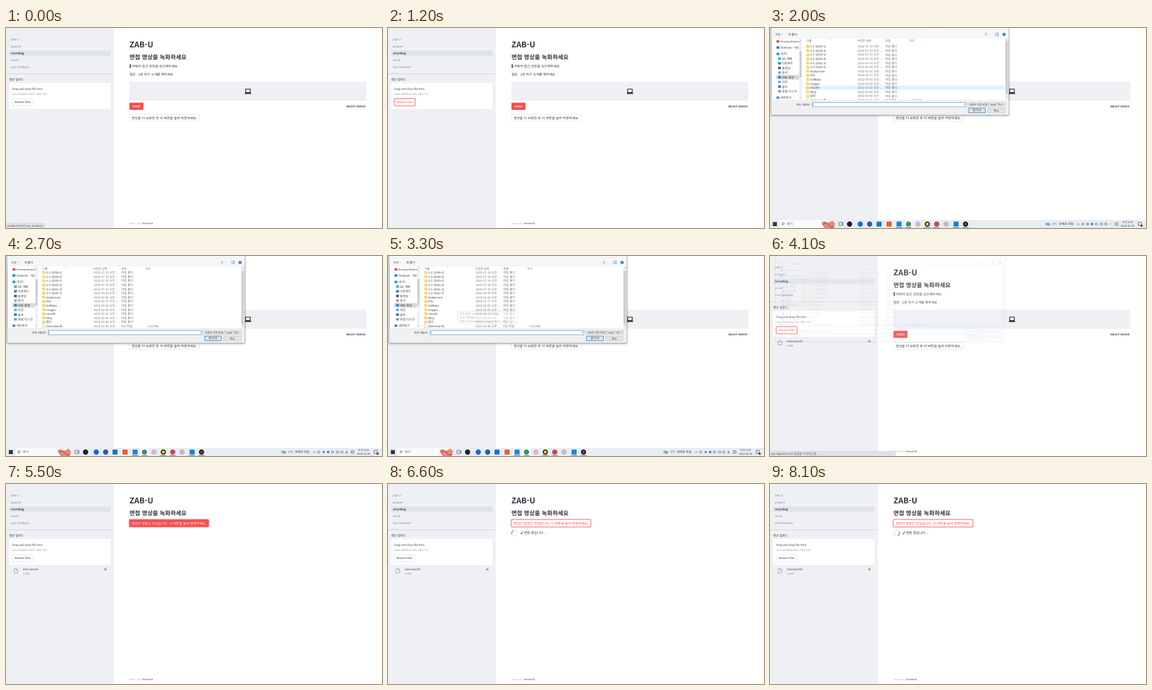
These frames come from a looping animation (600 px wide and 320 px high, 8200 ms). An HTML page:

```html
<!DOCTYPE html>
<html lang="ko">
<head>
<meta charset="utf-8">
<title>Recording page</title>
<style>
  html, body { margin: 0; width: 100%; height: 100%; overflow: hidden; background: #fff; }
  svg { display: block; width: 600px; height: 320px; text-rendering: geometricPrecision;
        font-family: "Noto Sans CJK KR", "Noto Sans CJK JP", "Noto Sans CJK", "Noto Sans", sans-serif; }
</style>
</head>
<body>
<svg id="stage" viewBox="0 0 600 320" xmlns="http://www.w3.org/2000/svg"></svg>
<script>
const LOOP = 8200, STEP = 100;
const INK = '#31333f', MUTED = '#8b8d96', PANEL = '#eef0f4', RED = '#f64e4e';

// y is the middle of the line of text
const text = (x, y, size, str, fill = INK, extra = '') =>
  `<text x="${x}" y="${(y + size * 0.36).toFixed(2)}" font-size="${size}" fill="${fill}" ${extra}>${str}</text>`;
const rect = (x, y, w, h, fill, extra = '') =>
  `<rect x="${x}" y="${y}" width="${w}" height="${h}" fill="${fill}" ${extra}/>`;
const circle = (x, y, r, fill, extra = '') =>
  `<circle cx="${x}" cy="${y}" r="${r}" fill="${fill}" ${extra}/>`;
const path = (d, stroke, width = 0.6, extra = '') =>
  `<path d="${d}" fill="none" stroke="${stroke}" stroke-width="${width}" ${extra}/>`;
const group = (id, body, extra = '') => `<g id="${id}" ${extra}>${body}</g>`;
const BOLD = 'font-weight="700"', MID = 'text-anchor="middle"';

function button(x, y, w, h, label, size, { fill = '#fff', ink = INK, edge = '#d6d7dc', glow = false } = {}) {
  const halo = glow ? rect(x - 0.6, y - 0.6, w + 1.2, h + 1.2, 'none', 'rx="1.6" stroke="#f64e4e" stroke-opacity=".4" stroke-width="1.3"') : '';
  return halo + rect(x, y, w, h, fill, `rx="1.2" stroke="${edge}" stroke-width=".6"`) +
    text(x + w / 2, y + h / 2, size, label, ink, MID);
}

function sidebar() {
  const items = ['ZAB-U', 'prepare', 'recording', 'result', 'user feedback'];
  const browse = [10.2, 113.2, 32.8, 11, 'Browse files', 4.5];
  return rect(0, 0, 172, 320, PANEL) +
    rect(5, 36, 162, 8.8, '#e0e3ea', 'rx="1"') +
    items.map((s, i) => text(7.7, 18 + i * 11.2, 4.45, s, i === 2 ? INK : '#7d808a', i === 2 ? BOLD : '')).join('') +
    rect(0, 72.8, 172, 0.8, '#cfd1d8') +
    text(5, 82, 4.75, '영상 업로드') +
    rect(5, 88, 162, 41.5, '#fff', 'rx="1"') +
    text(10, 97.5, 4.45, 'Drag and drop file here') +
    text(10, 105.3, 3.8, 'Limit 200MB per file • MP4, FLV', MUTED) +
    group('browseIdle', button(...browse)) +
    group('browseHot', button(...browse, { ink: RED, edge: RED, glow: true })) +
    group('upload',
      path('M13 135.4h3.6l2 2v5h-5.6zM16.4 135.4v2.2h2.2', MUTED, 0.7) +
      text(26.7, 136.4, 4.4, 'interview.flv') + text(26.7, 143.3, 3.8, '4.4MB', MUTED) +
      path('M156.9 134.8l3.4 3.4m0-3.4l-3.4 3.4', INK, 0.8));
}

function mainArea() {
  const convert = [197, 57, 126.3, 11.4, '영상이 업로드 되었습니다. 이 버튼을 눌러 변환하세요.', 5.3];
  return text(197, 26.3, 12.5, 'ZAB-U', INK, BOLD) +
    text(197, 46.6, 9.35, '면접 영상을 녹화하세요', INK, BOLD) +
    group('recorder',
      rect(197.4, 58, 1.9, 6, '#58404a') +
      text(201, 61, 5.3, '카메라 접근 권한을 승인해주세요') +
      text(197, 74, 5.25, '<tspan font-weight="500">질문</tspan> : 1분 자기 소개를 해주세요') +
      rect(197, 86, 378, 30.6, PANEL, 'rx="1"') +
      path('M382.4 97.8h7.4v5.6h-7.4z', '#15161c', 1.1) + rect(381, 104.2, 10.2, 1.3, '#15161c') +
      rect(197, 119.5, 22.2, 11.4, RED, 'rx="1"') +
      text(208.1, 125.1, 4.15, 'START', '#fff', BOLD + MID.padStart(MID.length + 1)) +
      text(543, 125.1, 4.1, 'SELECT DEVICE', INK, BOLD) +
      button(197, 138.2, 111.5, 11, '영상을 다 녹화한 후 이 버튼을 눌러 저장하세요.', 5.3)) +
    group('convertIdle', button(...convert)) +
    group('convertHover', button(...convert, { ink: RED, edge: RED })) +
    group('convertPressed', button(...convert, { fill: RED, ink: '#fff', edge: RED, glow: true })) +
    group('convertFocus', button(...convert, { ink: RED, edge: RED, glow: true })) +
    group('working',
      circle(202, 78.4, 4.5, 'none', 'stroke="#d9dbe1" stroke-width="1"') +
      path('M198.82 75.22A4.5 4.5 0 0 1 205.18 75.22', '#1c83c9', 1.1, 'id="arc"') +
      path('M211.6 78.4l1.3 1.8 2.2-4.2', INK, 0.9) + text(217, 78.1, 5.3, '변환 중입니다...')) +
    text(197, 313, 3.85, 'Made with <tspan font-weight="700" fill="#777983">Streamlit</tspan>', '#b0b2b9');
}

function statusBubble(id, width, size, label) {
  return group(id, rect(-1, 312.3, width + 1, 9, '#dfe1e5', 'stroke="#c6c8cc" stroke-width=".4"') +
    text(1.5, 316.3, size, label, '#4f5157'));
}

function taskbar() {
  const apps = [[127, '#202124'], [144, '#2463d8'], [159, '#3157a8'], [174, '#1479c9'], [190, '#f05a28'],
    [206, '#2287d6'], [221, '#4a8f5a'], [236, '#d9b4c4'], [251, '#3a3200'], [266, '#d8414a'],
    [281, '#b9bec6'], [297, '#1684d0'], [312, '#292326']];
  const squares = [174, 190, 206, 297];
  const icon = ([x, c]) => squares.includes(x) ? rect(x - 4, 309.8, 8, 8, c, 'rx="1"') : circle(x, 313.8, 4.2, c);
  const tray = [499, 507, 514, 521, 529, 536];
  return rect(0, 307, 600, 13, '#e7edf3') +
    rect(4.5, 310.5, 6.5, 6.5, '#30343a') +
    rect(15, 307.3, 89, 12.7, '#f8fafb') +
    circle(21, 313, 1.6, 'none', 'stroke="#333" stroke-width=".6"') + path('M19.9 314.3l-1.6 1.8', '#333') +
    text(27, 313.7, 4.9, '찾기', '#555') +
    `<path d="M82 311q6-4 10 1l8-4 4 5-3 7H87z" fill="#e58a78"/>` +
    path('M84 315q6-6 10 0t9 2', '#b7433f', 1.2) +
    path('M110 311h5v5h-5zM116.3 310.5v6', '#444', 0.7) +
    rect(214, 307, 14, 13, '#f8fafc') + apps.map(icon).join('') +
    circle(251, 313.8, 2.3, '#fddc12') + circle(312, 313.8, 1.7, '#e3343b') +
    [206, 221, 251, 266, 297, 312].map(x => rect(x - 5, 319, 10, 1, '#3b83c0')).join('') +
    circle(441.5, 313.5, 2.2, '#7fb2dc') + circle(444.5, 314.2, 2.4, '#91a0b1') +
    text(449.3, 313.7, 4.4, '-1°C') + text(461, 313.7, 4.75, '대체로 흐림') +
    path('M490 314.8l1.9-2 1.9 2', '#333') +
    tray.map((x, i) => i === 1 || i === 2
      ? circle(x, 313.7, 1.9, i === 1 ? '#4a98cc' : '#2878d8')
      : path(`M${x - 1.7} 312.2h3.4v3h-3.4z`, '#4a4d52')).join('') +
    group('imeOld', text(543.5, 313.6, 5, 'A', '#aab0b7', MID)) +
    group('imeNew', text(543.5, 313.6, 5.6, 'A', '#222', MID)) +
    path('M550.8 311.5h4.4v4.3h-4.4zM551.8 313.7h2.4', '#444') +
    text(570.5, 310.8, 4.15, '오전 2:24', INK, MID) + text(570.5, 316.8, 4.1, '2023-02-09', INK, MID) +
    path('M587.5 310.8h5v4.6h-3l-1.3 1.3v-1.3h-.7z', '#333') + circle(593, 316.3, 1.9, '#4c5055');
}

const ROW = 6.6;
const files = [
  ['1-1 (2018-1)', '2022-07-19 오전'], ['1-2 (2018-2)', '2022-07-19 오전'], ['2-1 (2019-1)', '2022-07-19 오전'],
  ['2-2 (2019-2)', '2022-07-19 오전'], ['3-1 (2021-2)', '2022-07-19 오전'], ['3-2 (2022-1)', '2022-09-04 오후'],
  ['studyroom', '2023-02-02 오후'], ['DSL', '2023-01-17 오전'], ['GitRepo', '2022-09-05 오후'],
  ['images', '2023-02-05 오후'], ['vscode', '2022-10-11 오전'], ['MLQ', '2023-02-06 오후'],
  ['잡다', '2023-02-08 오전'], ['interview.flv', '2023-02-06 오후']];

function fileRow([name, date], i) {
  const y = 29.6 + i * ROW, isFile = name.endsWith('.flv');
  const glyph = isFile ? rect(58.7, y - 2.4, 3.8, 4.8, '#fff', 'stroke="#999" stroke-width=".4"')
    : rect(58, y - 2.3, 2.6, 2, '#e9b949') + rect(58, y - 1.7, 5, 4, '#f9d573');
  return glyph + text(64.3, y, 4.55, name) + text(140, y, 4.65, date + ' ...', '#6d6d6d') +
    text(184, y, 4.75, isFile ? 'FLV 파일' : '파일 폴더', '#6d6d6d') +
    (isFile ? text(243, y, 4.5, '4,537KB', '#6d6d6d', 'text-anchor="end"') : '');
}

function dialog() {
  const places = [['Drawing Meadow', 21.5, '#e0554a', 16.5, 3.9], ['FileNook - 개인', 31.3, '#2386d2', 16.5, 4.4],
    ['내 PC', 41.5, '#3c93c8', 16.5, 4.8], ['3D 개체', 49, '#45b3c7'], ['다운로드', 56.4, '#2d82cc'],
    ['동영상', 64, '#555f70'], ['문서', 71.4, '#9aa4b0'], ['바탕 화면', 78.8, '#1f8ad0'], ['사진', 86.3, '#78a9c8'],
    ['음악', 93.8, '#2b7fd0'], ['로컬 디스크', 101.2, '#8d959e'], ['네트워크', 111.5, '#3c93c8', 16.5, 4.8]];
  const place = ([name, y, color, x = 19, size = 4.85]) =>
    rect(x - 6.2, y - 2, 4.6, 4, color, 'rx=".8"') + text(x, y, size, name);
  const headers = [['이름', 58], ['수정한 날짜', 139], ['유형', 184], ['크기', 222]];
  return rect(2, -8, 379, 147, '#fff', 'stroke="#777" stroke-width=".6" filter="url(#shade)"') +
    rect(2.3, -8, 378.4, 12, '#f7f7f7') + rect(8, -6, 240, 8, '#fff', 'stroke="#ccc" stroke-width=".4"') +
    rect(282, -6, 92, 8, '#fff', 'stroke="#ccc" stroke-width=".4"') +
    rect(2.3, 4, 378.4, 12, '#f6f7f9') + rect(2.3, 15.8, 378.4, 0.4, '#dcdcdc') +
    text(8, 10.2, 4.6, '구성') + path('M17.6 9.6l1.3 1.2 1.3-1.2', '#555', 0.5) + text(29, 10.2, 4.6, '새 폴더') +
    path('M342.5 8.5h4.5m-4.5 1.6h4.5m-4.5 1.6h4.5M349 9.7l1 1 1-1', '#8c96a0', 0.5) +
    path('M360 8h4.5v4.4H360zM363 8v4.4', '#4d86b5') + circle(373.5, 10.3, 2.5, '#1976c5') +
    text(373.5, 10.3, 3.6, '?', '#fff', MID + ' ' + BOLD) +
    `<g clip-path="url(#navClip)">${rect(10, 75.2, 37, 7.2, '#d9d9d9')}${places.map(place).join('')}</g>` +
    rect(46.8, 16.3, 4, 98.7, '#f0f0f0') + rect(47.2, 37, 3.2, 42, '#cdcdcd') +
    path('M47.8 20l1-1 1 1m-2 91l1 1 1-1', '#666', 0.5) +
    headers.map(([s, x]) => text(x, 20, 4.6, s, '#5b6775')).join('') +
    path('M137.5 17v6.4M182.5 17v6.4M220.5 17v6.4M244.5 17v6.4', '#e0e0e0', 0.4) +
    path('M94 18l1.3-1 1.3 1', '#777', 0.4) +
    `<g clip-path="url(#listClip)"><g id="rows">` +
    group('hoverFolder', rect(55, 29.6 + 10 * ROW - 3.3, 318, ROW, '#e3f1fc')) +
    group('hoverFile', rect(55, 29.6 + 13 * ROW - 3.3, 318, ROW, '#cce8ff')) +
    files.map(fileRow).join('') + `</g></g>` +
    rect(375.2, 16.3, 4.8, 98.7, '#f0f0f0') + rect(375.8, 21, 3.6, 85, '#cdcdcd', 'id="thumb"') +
    path('M376.5 19.6l1.1-1 1.1 1m-2.2 91l1.1 1 1.1-1', '#666', 0.5) +
    group('tip', rect(111.5, 88.7, 95, 20, '#fff', 'stroke="#aaa" stroke-width=".5"') +
      ['만든 날짜: 2023-02-06 오후 3:08', '크기: 143KB', '파일: archivedprep, result_final, vid...']
        .map((s, i) => text(114, 92.4 + i * 6.1, 4.5, s, '#575757')).join('')) +
    rect(2.3, 115, 378.4, 23.7, '#f0f0f0') +
    text(64.5, 122.6, 4, '파일 이름(N):', INK, 'text-anchor="end"') +
    rect(67.5, 119.2, 245, 6.8, '#fff', 'stroke="#2986cc" stroke-width=".6"') +
    path('M69 120.6v4', '#222', 0.4) + path('M309 122l1.2 1.2 1.2-1.2', '#444', 0.5) +
    group('chosen', text(69, 122.6, 4.3, 'interview.flv')) +
    rect(315.5, 119.2, 60, 6.8, '#e9e9e9', 'stroke="#adadad" stroke-width=".4"') +
    text(317.5, 122.6, 4.1, '사용자 지정 파일 (*.mp4;*.flv)') + path('M372 122l1 1 1-1', '#444', 0.5) +
    rect(317, 128.2, 26.5, 7.4, '#e1e7ec', 'stroke="#1d7fce" stroke-width=".8"') + text(330.3, 131.9, 4.4, '열기(O)', INK, MID) +
    rect(347.5, 128.2, 27.5, 7.4, '#e4e4e4', 'stroke="#adadad" stroke-width=".4"') + text(361.3, 131.9, 4.6, '취소', INK, MID);
}

const stage = document.getElementById('stage');
stage.innerHTML = `<defs>
  <clipPath id="navClip"><rect x="3" y="16.3" width="43.8" height="98.7"/></clipPath>
  <clipPath id="listClip"><rect x="52" y="23.5" width="323" height="91.5"/></clipPath>
  <filter id="shade" x="-5%" y="-10%" width="110%" height="120%">
    <feDropShadow dx="0" dy="1.2" stdDeviation="1.8" flood-opacity=".35"/></filter></defs>` +
  rect(0, 0, 600, 320, '#fff') + sidebar() + mainArea() +
  statusBubble('linkStatus', 62, 4.15, 'localhost:8521/user_feedback') +
  statusBubble('waitStatus', 200, 4.5, 'api.segment.io의 응답을 기다리는 중...') +
  group('taskbar', taskbar()) + group('dialog', dialog());

const el = id => document.getElementById(id);
const ramp = (t, from, to) => Math.min(1, Math.max(0, (t - from) / (to - from)));
const fade = (id, value) => {
  el(id).setAttribute('opacity', value);
  el(id).style.display = value > 0 ? '' : 'none';
};
const show = (id, t, from, to = LOOP) => fade(id, t >= from && t < to ? 1 : 0);

function render(t) {
  fade('linkStatus', 1 - ramp(t, 100, 400));
  fade('waitStatus', t < 4100 ? 0 : 1 - ramp(t, 5100, 5300));

  const browseHot = t >= 1100 && t < 5000;
  fade('browseHot', browseHot ? 1 : 0);
  fade('browseIdle', browseHot ? 0 : 1);
  show('upload', t, 4000);

  show('taskbar', t, 1500, 4100);
  show('imeOld', t, 0, 2100);
  show('imeNew', t, 2100);

  const opening = ramp(t, 1700, 1900), closing = ramp(t, 3900, 4130);
  const scale = 0.96 + 0.04 * Math.min(opening, 1 - closing);
  fade('dialog', Math.min(opening, 1 - closing));
  el('dialog').setAttribute('transform', `translate(191 65) scale(${scale}) translate(-191 -65)`);
  const scroll = 3.1 * ramp(t, 2300, 2500);
  el('rows').setAttribute('transform', `translate(0 ${-scroll})`);
  el('thumb').setAttribute('y', 21 + scroll);
  show('hoverFolder', t, 1900, 2400);
  show('hoverFile', t, 3500);
  show('chosen', t, 3700);
  fade('tip', t < 3000 ? ramp(t, 2700, 2900) : 1 - ramp(t, 3100, 3500));

  show('recorder', t, 0, 4400);
  show('convertIdle', t, 4400, 5200);
  show('convertHover', t, 5200, 5400);
  show('convertPressed', t, 5400, 5700);
  show('convertFocus', t, 5700);
  show('working', t, 5800);
  el('arc').setAttribute('transform', `rotate(${110 + (t - 8100) * 0.36} 202 78.4)`);
}

const start = performance.now();
function tick() {
  const t = (performance.now() - start) % LOOP;
  render(Math.floor(t / STEP) * STEP);
  requestAnimationFrame(tick);
}
tick();
</script>
</body>
</html>
```
